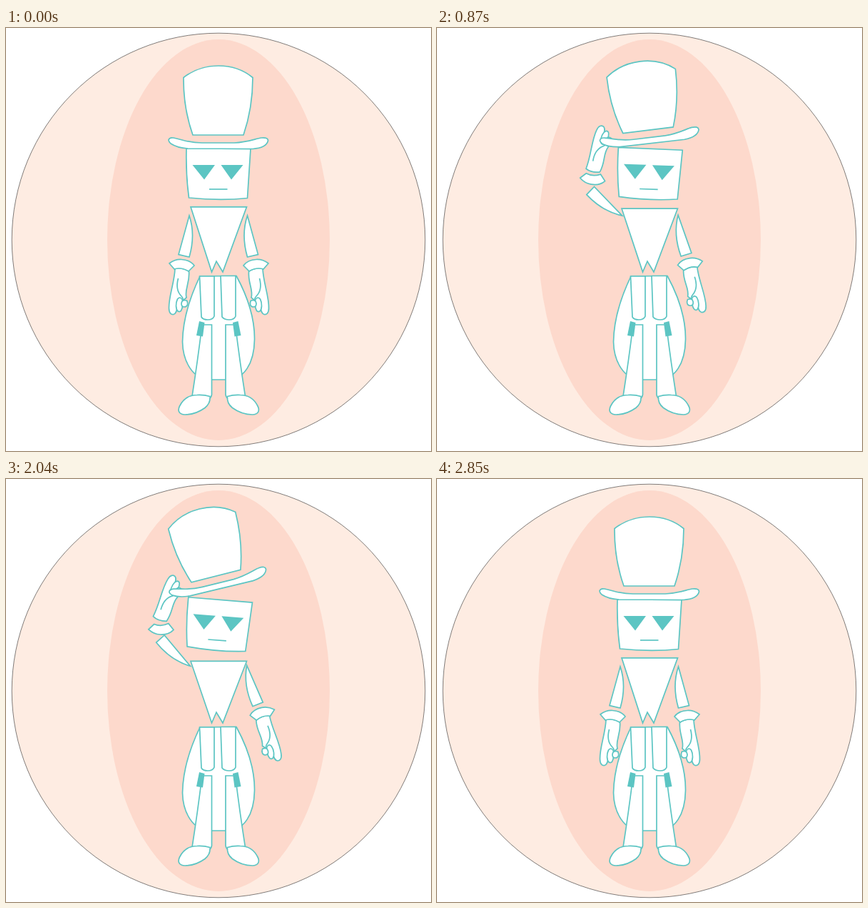
An HTML page that plays this animation: 596x593 px, repeating every 3.42 s.

```html
<!DOCTYPE html>
<html lang="en">
<head>
<meta charset="utf-8">
<title>Tipping the hat</title>
<style>
  html, body { margin: 0; width: 100%; height: 100%; overflow: hidden; background: #fff; }
  svg { display: block; width: 596px; height: 593px; }
  #figure { fill: #fff; stroke: #5cc5c3; stroke-width: 1.7; }
  .solid { fill: #5cc5c3; stroke: none; }
  .line { fill: none; }
</style>
</head>
<body>
<svg viewBox="0 0 596 593">
  <defs>
    <path id="arm" d="M257 263Q266 290 257 321L242 317.5Z"/>
    <path id="cuff" d="M229 330Q237 324 246 324.5Q258 325 264 333L256 341Q246 335 236 338Z"/>
    <g id="hand">
      <path d="M237 337.5C236 358 228 376 228.5 393C228.5 400 232 402 235 401.5C240 400 239 394 241 388L253 378C250 366 258 358 256.5 341Q246 335 237 337.5Z"/>
      <path d="M240.5 380C237.5 386 238 394 241 397C245 399.500 247.500 394 247.500 388C248.500 383 247 379 244 378Q242 378 240.500 380Z"/>
      <path d="M247 383C245 387 246 391 250 391C255 391 255.500 386 253.500 382Q248 381 247 383Z"/>
      <path class="line" d="M241.500 351C238.500 362 241 371 246 376Q249 379 248 383"/>
    </g>
    <g id="leg">
      <path d="M275 416H288.5V514Q288 518 285 520H261V516Q268 472 275 416Z"/>
      <path class="solid" d="M271 411L278.5 413L276 432.5L267 431Z"/>
      <path d="M286 516.5Q287 526 279 532.5C270 539 260 542 251 542C242 541.5 240.5 536 243.5 530C249 519 258 514.5 268 514.5Q278 514 286 516.5Z"/>
    </g>
  </defs>

  <circle cx="298" cy="297" r="289.8" fill="#feece2" stroke="#000" stroke-width=".5"/>
  <ellipse cx="298" cy="297" rx="156" ry="281" fill="#fdd9cc"/>

  <g id="figure">
    <path d="M272 348L323 347.5C338 375 349 405 348.5 437C348 470 334 493 310 493H286C262 493 248 467 247.5 440C248 408 259.5 374 272 348Z"/>
    <path d="M271.5 348H292V404Q290 409 283 409Q276 409 274 405Z"/>
    <path d="M301 347.5H322V404Q320 409 313 409Q306 409 303 405Z"/>
    <use href="#leg"/>
    <use href="#leg" transform="translate(596.5) scale(-1 1)"/>

    <use href="#arm" id="leftArm"/>
    <use href="#hand" id="leftHand"/>
    <use href="#cuff" id="leftCuff"/>
    <g id="rightArm">
      <g transform="translate(597) scale(-1 1)">
        <use href="#arm" x="1.5"/>
        <use href="#hand"/>
        <use href="#cuff"/>
      </g>
    </g>
    <path id="torso"/>

    <g id="head">
      <path d="M253 169L343 169.5L338.5 238.5Q300 242.500 256.5 238Q252 205 253 169Z"/>
      <path class="solid" d="M261.5 192H293L278 212.5ZM301.5 192H332.5L316 212.5Z"/>
      <path class="line" id="mouth"/>
    </g>
    <path id="brim" d="M228 157Q229 153 235 154C250 157 255 161 275 161H320C340 160 350 155 358 154Q367.5 153 367.5 158Q365 168 346 169.5L255 169Q240 168 231 162Q228 159 228 157Z"/>
    <path id="crown" d="M249 69.5Q270 53 298 53Q326 53 346 69.5Q346 112 333 150H262Q248.5 112 249 69.5Z"/>
  </g>
</svg>
<script>
const LOOP = 3420, STEP = 30;
const el = id => document.getElementById(id);
const ease = p => p < .5 ? 2 * p * p : 1 - 2 * (1 - p) ** 2;
const ramp = (t, a, b) => ease(Math.min(1, Math.max(0, (t - a) / (b - a))));

// Moves the part's pivot (px, py) to (x, y) and turns the part about it.
function place(id, px, py, x, y, turn, flip = 1) {
  el(id).setAttribute('transform',
    `translate(${x} ${y}) rotate(${turn}) scale(${flip} 1) translate(${-px} ${-py})`);
}

function draw(t) {
  const reach = ramp(t, 0, 630) - ramp(t, 2460, 2850);
  const tip = ramp(t, 690, 1080) - ramp(t, 1935, 2340);
  const smile = ramp(t, 1110, 1320) - ramp(t, 1680, 1890);
  const bump = Math.sin(Math.PI * reach);

  // Left arm: shoulder, then the cuff on a swing around it, then the hand.
  const sx = 257 + 4 * reach - 3 * tip;
  const sy = 263 + reach - 6 * bump - 2 * tip;
  place('leftArm', 257, 263, sx, sy, 116.7 * reach + 9.3 * tip);

  const swing = (8.7 + 131.3 * reach ** 1.08) * Math.PI / 180;
  const dist = 69.3 - 3.6 * reach - 7.6 * bump;
  const cx = sx - dist * Math.sin(swing) + 1.5 * tip;
  const cy = sy + dist * Math.cos(swing) - tip;
  const flipped = reach > .6;
  const flip = flipped ? -1 : 1;
  const turn = 175 * reach + (flipped ? 23 : 0);
  place('leftCuff', 246.5, 331.5, cx, cy, turn - 14 * tip, flip);

  const wrist = 175 * reach * Math.PI / 180;
  place('leftHand', 246.5, 340,
    cx - 8.5 * Math.sin(wrist) + 7 * bump + (flipped ? 3.5 : 0) - 5 * tip,
    cy + 8.5 * Math.cos(wrist) - 3 * reach ** 2 - 5 * tip,
    turn + 14 * tip, flip);

  place('rightArm', 338.5, 263, 338.5 - tip, 263 - 2 * tip, -9.5 * tip);
  place('head', 297.5, 204, 297.5, 204, 5 * tip);
  place('crown', 297.5, 150, 297.5 - 3.5 * tip, 150 - 16 * tip, -16.4 * tip);
  place('brim', 228, 157, 228 + tip, 157 + 2 * tip, -16 * tip);

  const top = 250.8 + 5.4 * tip;
  el('torso').setAttribute('d', `M259 ${top}H337.5L304 342L295 327L288.5 342Z`);
  el('mouth').setAttribute('d', `M285 226Q298 ${226 + 11 * smile} 310.5 226`);
}

const start = performance.now();
function tick() {
  const t = (performance.now() - start) % LOOP;
  draw(Math.floor(t / STEP) * STEP);
  requestAnimationFrame(tick);
}
tick();
</script>
</body>
</html>
```
